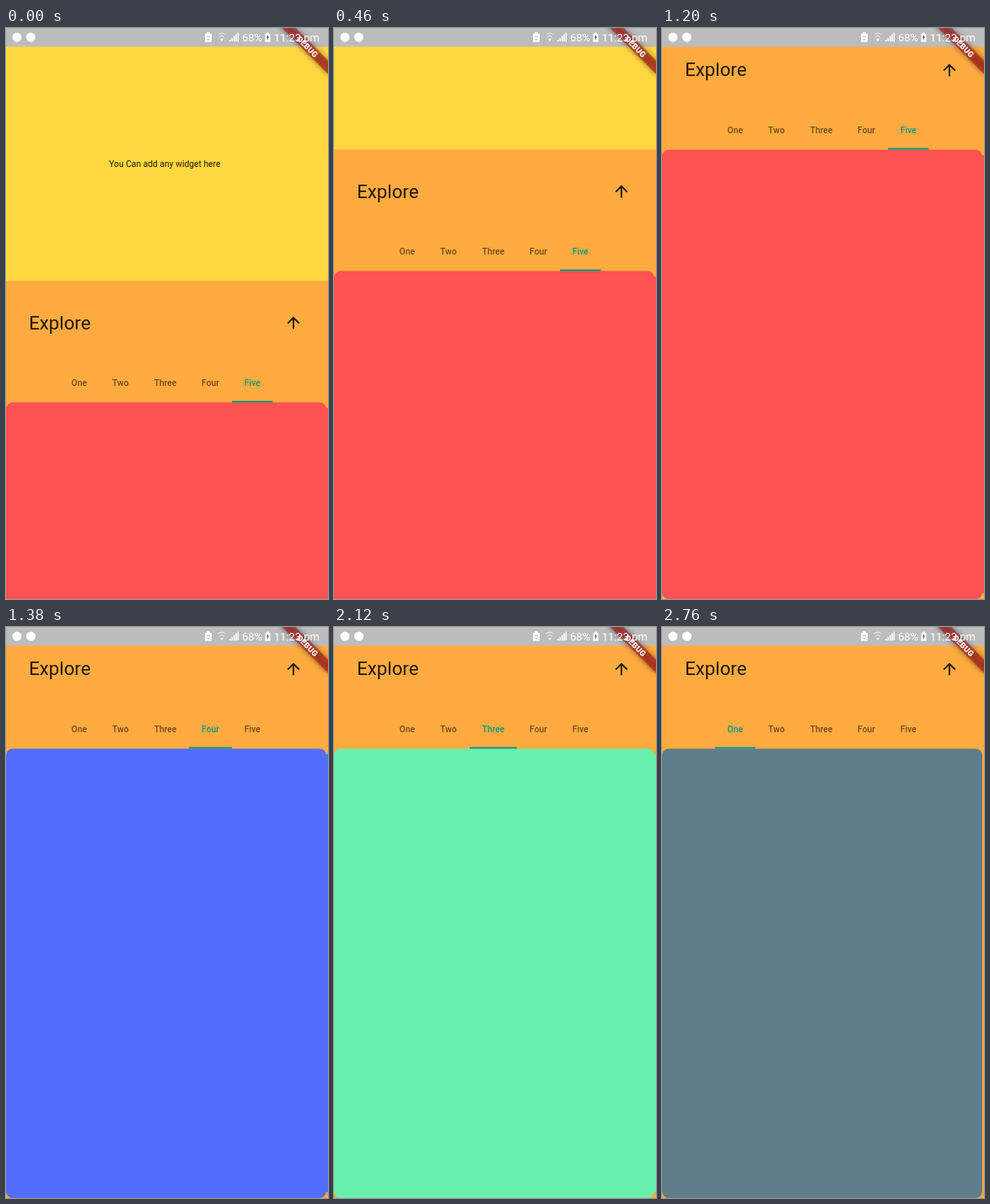
Write an HTML page that moves like this. It is 382 px wide and 678 px high and loops after 3.22 s.

```html
<!DOCTYPE html>
<html lang="en">
<head>
<meta charset="utf-8">
<title>Explore tabs</title>
<style>
  html, body { margin: 0; width: 100%; height: 100%; overflow: hidden; background: #ffab40; }
  svg { display: block; width: 100%; height: 100%; font-family: Roboto, sans-serif; }
  .tab { font-size: 10.3px; font-weight: 500; text-anchor: middle; }
</style>
</head>
<body>
<svg viewBox="0 0 382 678">
  <defs>
    <filter id="blur" x="-30%" y="-150%" width="160%" height="400%">
      <feGaussianBlur stdDeviation="3.2"/>
    </filter>
  </defs>

  <rect width="382" height="678" fill="#ffd740"/>
  <text x="188.3" y="164.5" font-size="10.3" text-anchor="middle" fill="#000" fill-opacity=".87">You Can add any widget here</text>

  <g id="page">
    <rect width="382" height="680" fill="#ffab40"/>
    <text x="27.2" y="57.4" font-size="22.2" fill="#000" fill-opacity=".87">Explore</text>
    <path transform="translate(329.9 38.7) scale(.926)" fill="#000" fill-opacity=".87"
      d="M4 12l1.41 1.41L11 7.83V20h2V7.83l5.58 5.59L20 12l-8-8-8 8z"/>
    <g id="tabs"></g>
    <g id="sheet">
      <rect y="144.4" width="380" height="533.6" rx="8"/>
      <rect id="edge" x="376" y="151" width="6" height="520"/>
    </g>
    <rect id="line" y="142.5" height="2" fill="#0c9683"/>
  </g>

  <rect width="382" height="22.2" fill="#bcbcbc"/>

  <g transform="translate(380 0) rotate(45)">
    <rect x="-40" y="26" width="80" height="11.2" fill="#000" fill-opacity=".5" filter="url(#blur)"/>
    <rect x="-40" y="26" width="80" height="11.2" fill="#b71c1c" fill-opacity=".63"/>
    <text y="35" font-size="9.5" font-weight="900" text-anchor="middle" fill="#fff">DEBUG</text>
  </g>

  <g fill="#fff">
    <circle cx="13" cy="11" r="5.5"/>
    <circle cx="29.5" cy="11" r="5.5"/>
    <path d="M236 7h2V5h4v2h2v9.5h-8z"/>
    <path d="M238 10.5h4M238.5 13.5h3" stroke="#bcbcbc"/>
    <g fill="none" stroke="#fff" stroke-opacity=".75">
      <path d="M251.5 8q4.5-4 9 0M253 10.7q3-2.6 6 0"/>
      <path d="M254.5 13.3h3l-1.5 2z" fill="#fff"/>
    </g>
    <path d="M265 14h1.6v2H265zM267.5 12h1.6v4h-1.6zM270 9.5h1.6V16H270zM272.3 7.5h1.5V16h-1.5zM274.6 5.5h1.4V16h-1.4z"/>
    <text x="280" y="15.6" font-size="13">68%</text>
    <path d="M307.5 7h1.5V5.5h3V7h1.5v9.5h-6z"/>
    <path d="M311 7.5l-2 4h1.4l-.6 3.5 2.2-4.4h-1.4z" fill="#444"/>
    <text x="317.7" y="15.6" font-size="13">11:23 pm</text>
  </g>
</svg>

<script>
const STEP = 460;
const names = ['One', 'Two', 'Three', 'Four', 'Five'];
const edges = [63, 110.6, 161, 217, 268, 316.6];
const colors = ['#607d8b', '#ffab40', '#69f0ae', '#536dfe', '#ff5252'];

// Each step: scroll offset of the page and the active tab
const steps = [[300.2, 4], [144.2, 4], [0, 4], [0, 3], [0, 2], [0, 1], [0, 0]];

const $ = id => document.getElementById(id);
const set = (el, attrs) => {
  for (const key in attrs) el.setAttribute(key, attrs[key]);
};

const labels = names.map((name, i) => {
  const el = document.createElementNS($('page').namespaceURI, 'text');
  set(el, { class: 'tab', x: (edges[i] + edges[i + 1]) / 2, y: 125 });
  el.textContent = name;
  return $('tabs').appendChild(el);
});

function draw(t) {
  const [offset, active] = steps[Math.floor(t / STEP) % steps.length];
  set($('page'), { transform: `translate(0 ${offset})` });
  set($('sheet'), { fill: colors[active] });
  // The first page has no neighbour showing at its right edge
  set($('edge'), { visibility: active ? 'visible' : 'hidden' });
  set($('line'), { x: edges[active], width: edges[active + 1] - edges[active] });
  labels.forEach((el, i) => set(el, {
    fill: i === active ? '#0c9683' : '#000',
    'fill-opacity': i === active ? 1 : 0.57
  }));
}

const start = performance.now();
function tick() {
  draw(performance.now() - start);
  requestAnimationFrame(tick);
}
tick();
</script>
</body>
</html>
```
